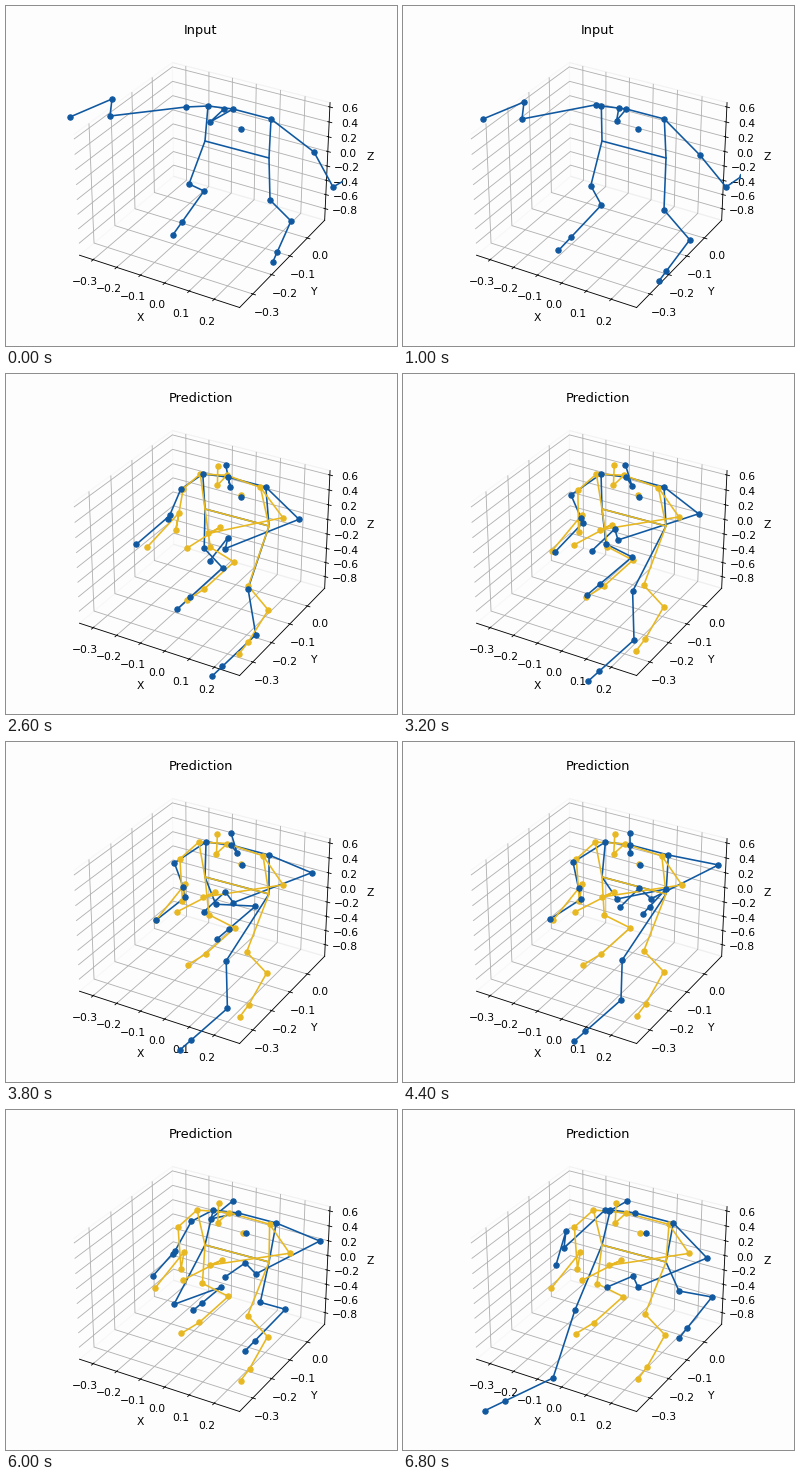
A matplotlib script that plays this animation: 391x340 px, repeating every 7 s.

```python
import numpy as np
import matplotlib.pyplot as plt
from matplotlib.animation import FuncAnimation

W, H, DPI = 391, 340, 77
FRAMES, STEP = 35, 200
SPLIT = 10  # observed frames before the prediction starts
BG, BLUE, GOLD = "#fdfdfd", "#1058a0", "#e8b822"
LEFT, TOP, SIDE = 52, 34.5, 285
HIP_L, HIP_R = (199, 135), (263, 152)


def path(t, *keys):
    """Smooth curve through (time, x, y) keys, flat at turning points."""
    keys = np.array(keys, float)
    times, points = keys[:, 0], keys[:, 1:]
    slopes = np.gradient(points, times, axis=0, edge_order=2)
    steps = np.diff(points, axis=0)
    slopes[1:-1][steps[:-1] * steps[1:] < 0] = 0
    i = int(np.clip(np.searchsorted(times, t + 1e-9) - 1, 0, len(times) - 2))
    span = times[i + 1] - times[i]
    s = (t - times[i]) / span
    ease = s * s * (3 - 2 * s)
    return ((1 - ease) * points[i] + ease * points[i + 1]
            + s * (1 - s) * span * ((1 - s) * slopes[i] - s * slopes[i + 1]))


def torso(t):
    """Shoulders and neck sway together."""
    sway = np.array([-5.5 * np.sin(2 * np.pi * t / 8.6), 0])
    return (202, 100) + sway, (227, 103) + sway, (265, 113) + sway


def head(t, neck):
    root = (235 + 8 * (t / 6.8) ** 3, 123)
    chin = neck + path(t, (0, -23, 13), (2.2, 0, 10), (4.4, 0, 8),
                       (5.2, -19, 9), (6.8, -26, -2))
    crown = neck + (-9 * np.cos(np.pi * t / 7.6) ** 2, -6 - 6 * np.tanh(2 * (t - 1.7)))
    return root, neck, chin, crown


def left_arm(t, shoulder):
    elbow = path(t, (0, 180, 101), (1.4, 194, 99), (3.2, 168, 121), (6.8, 202, 100))
    wrist = path(t, (0, 104, 110), (1, 119, 113), (1.8, 130, 139),
                 (3.2, 178, 144), (5.2, 172, 147), (6.8, 161, 138))
    thumb = wrist + (2, -17 + 28 * max(0, np.sin(np.pi * (t - 1.8) / 5)))
    hand = path(t, (0, 64, 111), (1, 80, 113), (1.8, 88, 146),
                (3.2, 152, 178), (5.2, 145, 173), (6.8, 153, 155))
    return shoulder, elbow, wrist, thumb, hand


def right_arm(t, shoulder):
    elbow = path(t, (0, 308, 146), (2.8, 293, 144), (4.8, 318, 121), (6.8, 304, 148))
    wrist = path(t, (0, 327, 181), (1, 323, 181), (1.8, 251, 183),
                 (3.2, 215, 166), (4.8, 254, 156), (6.8, 235, 177))
    thumb = wrist + (3 + 16 * np.cos(2 * np.pi * t / 10.2), -11)
    hand = wrist + (-3 - 28 * np.tanh(1.2 * (t - 2.2)), 14 - 0.3 * t * t)
    return shoulder, elbow, wrist, thumb, hand


def leg(knee, ankle, foot, toe):
    """The toe prolongs the foot by a fixed share."""
    return knee, ankle, ankle + foot, ankle + foot * (1 + toe)


def left_leg(t):
    knee = path(t, (0, 183, 178), (3.2, 203, 170), (4.4, 214, 157),
                (5.2, 182, 180), (6.8, 172, 200))
    ankle = path(t, (0, 198, 185), (3.2, 229, 183), (4.4, 263, 147),
                 (5.2, 253, 141), (6.8, 150, 268))
    foot = path(t, (0, -22, 31), (3.2, -32, 27), (5.2, -8, 14), (6.8, -48, 23))
    return leg(knee, ankle, foot, 0.42)


def right_leg(t):
    knee = path(t, (0, 264, 194), (1.8, 255, 210), (4.2, 218, 219),
                (5.2, 236, 204), (6.8, 276, 181))
    ankle = path(t, (0, 285, 215), (1.8, 276, 247), (3.2, 231, 266),
                 (4.4, 218, 258), (5.2, 249, 223), (6.8, 309, 187))
    foot = np.array([-36 + 22 * (t / 4 - 1) ** 2, 31.5])
    return leg(knee, ankle, foot, 0.31)


def observed(t):
    left, neck, right = torso(t)
    limbs = (head(t, neck), left_arm(t, left), right_arm(t, right),
             left_leg(t), right_leg(t))
    return [np.array(limb, float) for limb in limbs]


# Pose the prediction settles into, and the slow drift of each limb
REST = [
    [(236, 122), (222, 102), (211, 112), (212, 92)],
    [(192, 100), (173, 117), (176, 159), (179, 142), (150, 178)],
    [(260, 114), (280, 143), (200, 155), (212, 150), (173, 170)],
    [(200, 173), (226, 186), (197, 212), (179, 223)],
    [(241, 208), (261, 229), (243, 261), (234, 273)],
]
DRIFT = [(0.6, 0.5), (-0.8, 0), (3, 0.2), (-3, 0.3), (0.5, -2)]
START = 1.9


def predicted(t):
    fade = np.exp(-2.5 * (t - START))
    return [
        fade * first + (1 - fade) * (np.array(rest) + np.array(drift) * (t - 4.8))
        for first, rest, drift in zip(observed(START), REST, DRIFT)
    ]


def make_axes3d(fig, rect):
    ax = fig.add_axes(rect, projection="3d", facecolor=BG)
    ax.set(xlim=(-0.359, 0.300), ylim=(-0.3675, 0.1031), zlim=(-0.966, 0.659),
           xlabel="X", ylabel="Y", zlabel="Z")
    ax.set_xticks(np.arange(-3, 3) / 10)
    ax.set_yticks(np.arange(-3, 1) / 10)
    ax.set_zticks(np.arange(-4, 4) / 5)
    for axis in (ax.xaxis, ax.yaxis, ax.zaxis):
        axis.pane.fill = False
    return ax


class Skeleton:
    def __init__(self, ax, pose, color, line_z, dot_z):
        self.pose = pose
        self.bones = [ax.plot([], [], color=color, lw=1.5, zorder=line_z)[0]
                      for _ in range(7)]
        self.dots = ax.plot([], [], "o", color=color, ms=5, zorder=dot_z)[0]

    def update(self, t):
        limbs = self.pose(t)
        skull, arm_l, arm_r, leg_l, leg_r = limbs
        chains = [
            skull[1:],
            np.vstack([arm_l[0], skull[1], arm_r[0]]),
            arm_l,
            arm_r,
            np.vstack([arm_l[0], HIP_L, leg_l]),
            np.vstack([arm_r[0], HIP_R, leg_r]),
            np.array([HIP_L, HIP_R]),
        ]
        for bone, chain in zip(self.bones, chains):
            bone.set_data(*chain.T)
        self.dots.set_data(*np.vstack(limbs).T)

    def show(self, on):
        for artist in (*self.bones, self.dots):
            artist.set_visible(on)


# the tiny surplus guards against rounding down to a smaller canvas
fig = plt.figure(figsize=((W + 1e-4) / DPI, (H + 1e-4) / DPI), dpi=DPI, facecolor=BG)
rect = (LEFT / W, 1 - (TOP + SIDE) / H, SIDE / W, SIDE / H)
make_axes3d(fig, rect)

stage = fig.add_axes(rect)
stage.set(xlim=(LEFT, LEFT + SIDE), ylim=(TOP + SIDE, TOP))
stage.axis("off")
title = stage.set_title("Input", y=1.0)
truth = Skeleton(stage, observed, BLUE, 2, 5)
forecast = Skeleton(stage, predicted, GOLD, 3, 4)


def draw(i):
    t = i * STEP / 1000
    predicting = i >= SPLIT
    title.set_text("Prediction" if predicting else "Input")
    truth.update(t)
    forecast.show(predicting)
    if predicting:
        forecast.update(t)
    return []


anim = FuncAnimation(fig, draw, frames=FRAMES, interval=STEP, repeat=True)
plt.show()
```
